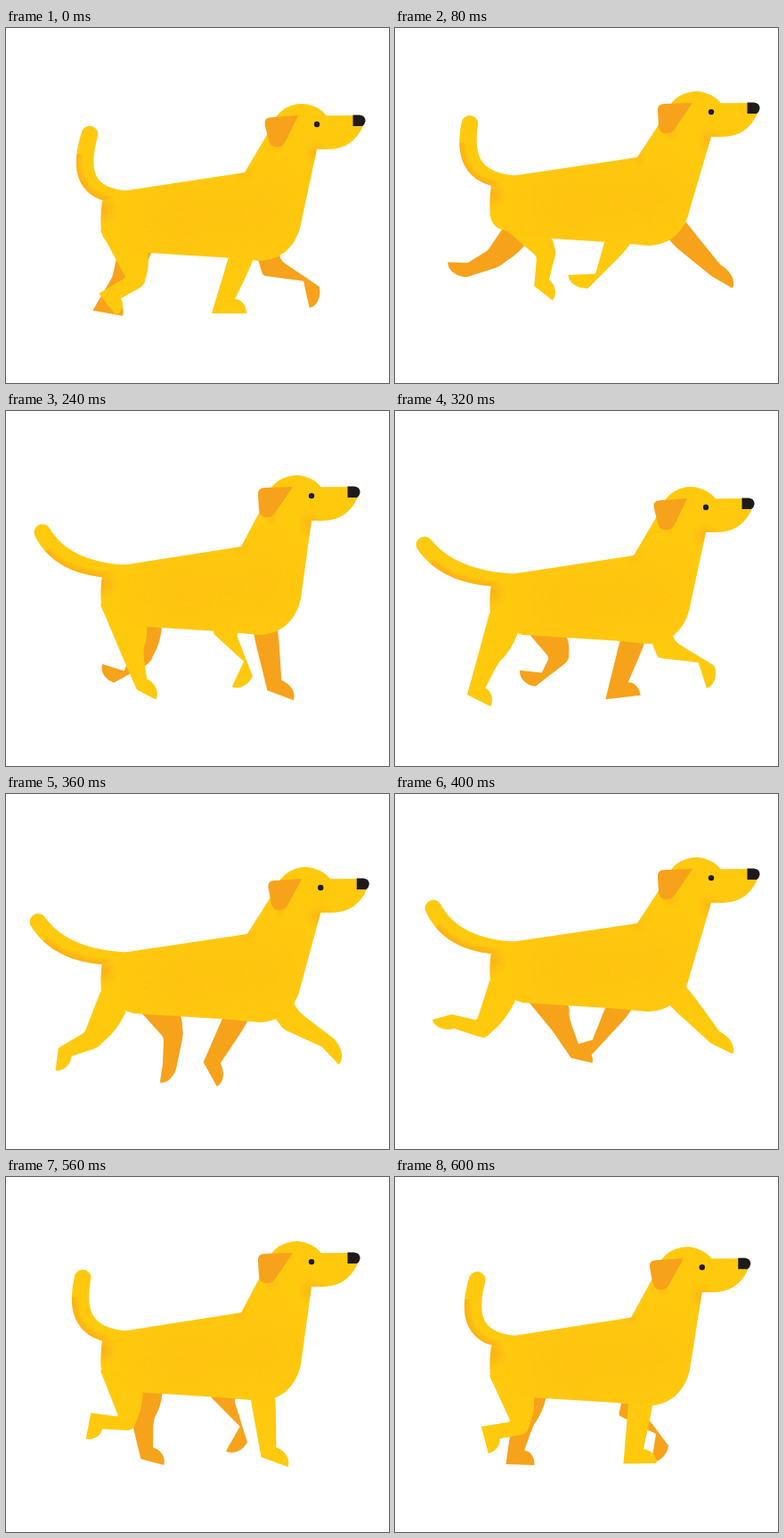
Write an HTML page with a canvas that moves like this. It is 430 px wide and 398 px high and loops after 0.64 s.

```html
<!DOCTYPE html>
<html lang="en">
<head>
<meta charset="utf-8">
<title>Walking dog</title>
<style>
html, body { margin: 0; width: 100%; height: 100%; overflow: hidden; background: #fff; }
canvas { display: block; width: 430px; height: 398px; }
</style>
</head>
<body>
<canvas id="stage"></canvas>
<script>
const W = 430, H = 398, LOOP = 640, STEP = 40;
const YELLOW = '#ffc90e', ORANGE = '#f7a21b', BLACK = '#1d1a17';
const { sin, cos, PI } = Math, RAD = PI / 180;
const canvas = document.getElementById('stage');
const ctx = canvas.getContext('2d');
const scale = window.devicePixelRatio || 1;
canvas.width = W * scale;
canvas.height = H * scale;

// Joint angles in degrees, evenly spaced over one loop.
// upper, lower: from straight down, forward is positive; foot: slope of the sole.
const FRONT_GAIT = {
  upper: [-20, -33, -37, -35, 19, 42, 31, 6],
  lower: [-20, -33, 8, 34, 70, 42, 31, 6],
  foot: [0, 177, 152, 115, 72, 26, 19, 20]
};
const NEAR_HIND_GAIT = {
  upper: [17, 41, 32, 15, -19, -24, -9, 8],
  lower: [-60, -10, 10, 17, -20, -106, -104, -95],
  foot: [52, 38, 28, 27, 27, 165, 139, 101]
};
const FAR_HIND_GAIT = {
  upper: [-17, -34, -22, 2, 30, 32, 17, 3],
  lower: [-35, -67, -70, -51, -45, 28, 17, 8],
  foot: [10, 182, 195, 197, 186, 13, 15, 15]
};

const FRONT = { x: 283, y: 205, upper: 66, lower: 48, knee: 13, ankle: 10, toe: 26, bulge: 0 };
const HIND = { x: 125, y: 218, upper: 69, lower: 33, knee: 11.5, ankle: 8.5, toe: 22, bulge: 0.1 };

// Smooth periodic interpolation of evenly spaced values.
function ease(keys, t) {
  const n = keys.length, p = t / LOOP * n + n, i = Math.floor(p), u = p - i;
  const [a, b, c, d] = [-1, 0, 1, 2].map(k => keys[(i + k) % n]);
  return b + u / 2 * (c - a + u * (2 * a - 5 * b + 4 * c - d + u * (3 * (b - c) + d - a)));
}

const mix = (a, b, k) => [a[0] + (b[0] - a[0]) * k, a[1] + (b[1] - a[1]) * k];
const dist = (a, b) => Math.hypot(b[0] - a[0], b[1] - a[1]) || 1;
const down = (p, a, len) => [p[0] + sin(a) * len, p[1] + cos(a) * len];
const ahead = (p, a, len) => [p[0] + cos(a) * len, p[1] - sin(a) * len];

function corner(prev, p, next, r) {
  const a = mix(p, prev, Math.min(0.5, r / dist(p, prev)));
  const b = mix(p, next, Math.min(0.5, r / dist(p, next)));
  ctx.lineTo(...a);
  ctx.quadraticCurveTo(...p, ...b);
}

function leg(type, gait, t, dx, dy, color) {
  const [a, b, f] = [gait.upper, gait.lower, gait.foot].map(k => ease(k, t) * RAD);
  const root = [type.x + dx, type.y + dy];
  const knee = down(root, a, type.upper);
  const ankle = down(knee, b, type.lower);
  const foot = (x, y) => [ankle[0] + cos(f) * x - sin(f) * y, ankle[1] + sin(f) * x + cos(f) * y];

  // The ankle narrows as the foot points along the shin.
  const along = sin(b + f);
  const w = type.ankle - 9 * along;
  const heel = foot(-w, 8), toe = foot(type.toe, 8), tip = foot(type.toe, -8), top = foot(w, -8);
  const back = ahead(knee, (a + b) / 2, -type.knee);
  const shin = ahead(knee, (a + b) / 2, type.knee);
  const hind = type === HIND;
  const start = hind ? [106 + dx, 227 + dy] : ahead(root, a, -16);
  const end = hind ? [149 + dx + 0.6 * a / RAD, 250 + dy] : ahead(root, a, 16);
  const m = mix(shin, end, 0.55);

  ctx.beginPath();
  ctx.moveTo(...start);
  corner(start, back, heel, 3);
  ctx.lineTo(...heel);
  ctx.lineTo(...toe);
  ctx.bezierCurveTo(...mix(toe, tip, 0.55), ...mix(top, tip, 0.55), ...top);
  corner(top, shin, end, 7);
  ctx.quadraticCurveTo(m[0] - (end[1] - shin[1]) * type.bulge,
    m[1] + (end[0] - shin[0]) * type.bulge, ...end);
  if (hind) ctx.lineTo(root[0], root[1] - 8);
  ctx.closePath();
  ctx.fillStyle = color;
  ctx.fill();
}

function tail(t, dy) {
  const u = 0.5 + 0.5 * cos(2 * PI * t / LOOP + 0.05);
  const x = 33 + 61 * u, y = 150 - 31 * u, r = 9.3;
  const c = [[x, y], [52 + 30 * u, 175 - 15 * u], [85 + 3 * u, 190 - 2 * u], [136, 189.5]];
  const upper = [], lower = [];
  for (let i = 0; i <= 30; i++) {
    const k = i / 30;
    const ab = mix(c[0], c[1], k), bc = mix(c[1], c[2], k), cd = mix(c[2], c[3], k);
    const a = mix(ab, bc, k), b = mix(bc, cd, k), p = mix(a, b, k), l = dist(a, b);
    const w = r + 0.8 * sin(PI * k) - 2.3 * k * k;
    const nx = (b[1] - a[1]) / l * w, ny = (a[0] - b[0]) / l * w;
    upper.push([p[0] + nx, p[1] + ny]);
    lower.push([p[0] - nx, p[1] - ny]);
  }
  ctx.save();
  ctx.translate(0, dy);
  ctx.fillStyle = YELLOW;
  ctx.beginPath();
  upper.concat(lower.slice().reverse()).forEach(p => ctx.lineTo(...p));
  ctx.closePath();
  ctx.moveTo(x + r, y);
  ctx.arc(x, y, r, 0, PI * 2);
  ctx.fill();
  ctx.clip();
  ctx.strokeStyle = 'rgba(247,162,27,.16)';
  for (let w = 3; w <= 15; w += 3) {
    ctx.lineWidth = w;
    ctx.beginPath();
    lower.slice(6).forEach(p => ctx.lineTo(...p));
    ctx.stroke();
  }
  ctx.restore();
}

function glow(x, y, r, alpha) {
  const g = ctx.createRadialGradient(x, y, 0, x, y, r);
  g.addColorStop(0, `rgba(247,162,27,${alpha})`);
  g.addColorStop(1, 'rgba(247,162,27,0)');
  ctx.fillStyle = g;
  ctx.fillRect(x - r, y - r, r * 2, r * 2);
}

function grain(dy) {
  let seed = 7;
  const rnd = () => (seed = seed * 16807 % 2147483647) / 2147483647;
  ctx.fillStyle = 'rgba(247,162,27,.16)';
  for (let i = 0; i < 500; i++) {
    ctx.fillRect(112 + rnd() * 215, 175 + (rnd() + rnd()) * 38 + dy, 1, 1);
  }
}

function body(dy, hx, hy, nx) {
  const head = (x, y) => [x + hx, y + hy];
  const low = (x, y) => [x, y + dy];
  ctx.beginPath();
  ctx.moveTo(...low(108, 194));
  ctx.lineTo(...low(130, 183));
  ctx.lineTo(268 + nx, 162 + dy);
  ctx.lineTo(...head(304, 101));
  ctx.arc(...head(332, 121), 36, Math.atan2(-21, -28), Math.atan2(-23, 28));
  ctx.lineTo(...head(396, 98));
  ctx.lineTo(...head(402, 106));
  ctx.bezierCurveTo(...head(397, 122), ...head(384, 136), ...head(362, 136));
  ctx.lineTo(...head(349, 136));
  ctx.lineTo(...low(331, 220));
  ctx.bezierCurveTo(...low(326, 245), ...low(308, 261), ...low(284, 261));
  ctx.lineTo(...low(247, 257.5));
  ctx.lineTo(...low(143, 251));
  ctx.lineTo(...low(117, 242));
  ctx.quadraticCurveTo(...low(109, 238), ...low(107, 228));
  ctx.quadraticCurveTo(...low(105.5, 212), ...low(108, 194));
  ctx.closePath();
  ctx.fillStyle = YELLOW;
  ctx.fill();
  ctx.save();
  ctx.clip();
  glow(200, 215 + dy, 75, 0.14);
  glow(285, 205 + dy, 65, 0.12);
  glow(108, 203 + dy, 18, 0.6);
  glow(348 + hx, 140 + hy, 15, 0.45);
  glow(268 + nx, 163 + dy, 11, 0.25);
  glow(304 + hx, 131 + hy, 10, 0.35);
  grain(dy);
  ctx.restore();
}

function face(hx, hy, swing) {
  ctx.save();
  ctx.translate(hx, hy);
  ctx.fillStyle = BLACK;
  ctx.beginPath();
  ctx.arc(349, 108, 3.2, 0, PI * 2);
  ctx.fill();
  ctx.beginPath();
  ctx.moveTo(389.5, 97.5);
  ctx.lineTo(397, 97.5);
  ctx.quadraticCurveTo(403.5, 98, 403.5, 104.5);
  ctx.quadraticCurveTo(403, 108, 400, 110);
  ctx.lineTo(389.5, 110);
  ctx.fill();

  // The ear hangs from its top edge, so it leans more than it turns.
  ctx.translate(328, 98);
  ctx.rotate(swing * 0.35);
  ctx.transform(1, 0, -swing, 1, 0, 0);
  const ear = [[0, 0], [-17, 36], [-31, 35], [-39, 3]];
  ctx.fillStyle = ORANGE;
  ctx.beginPath();
  ctx.moveTo(0, 0);
  for (let i = 1; i < 4; i++) corner(ear[i - 1], ear[i], ear[(i + 1) % 4], 8);
  ctx.fill();
  ctx.restore();
}

function draw(t) {
  // Body and head bob twice per loop, the head a little behind.
  const a = 4 * PI * t / LOOP, s = sin(a);
  const bob = -11.2 + 9 * cos(a) + 2.2 * cos(2 * a) + 2.2 * sin(2 * a);
  const dy = bob - 3.5 * s, hx = 6 * s, hy = bob - 0.5 * s;

  ctx.setTransform(scale, 0, 0, scale, 0, 0);
  ctx.fillStyle = '#fff';
  ctx.fillRect(0, 0, W, H);
  leg(HIND, FAR_HIND_GAIT, t, 25, dy, ORANGE);
  leg(FRONT, FRONT_GAIT, t + LOOP / 2 - 10, 0, dy, ORANGE);
  tail(t, dy);
  leg(HIND, NEAR_HIND_GAIT, t, 0, dy, YELLOW);
  leg(FRONT, FRONT_GAIT, t, 0, dy, YELLOW);
  body(dy, hx, hy, 4 * s);
  face(hx, hy, (8 - 7.5 * cos(a)) * RAD);
}

const start = performance.now();
function tick() {
  const t = (performance.now() - start) % LOOP;
  draw(Math.floor(t / STEP) * STEP);
  requestAnimationFrame(tick);
}
draw(0);
requestAnimationFrame(tick);
</script>
</body>
</html>
```
